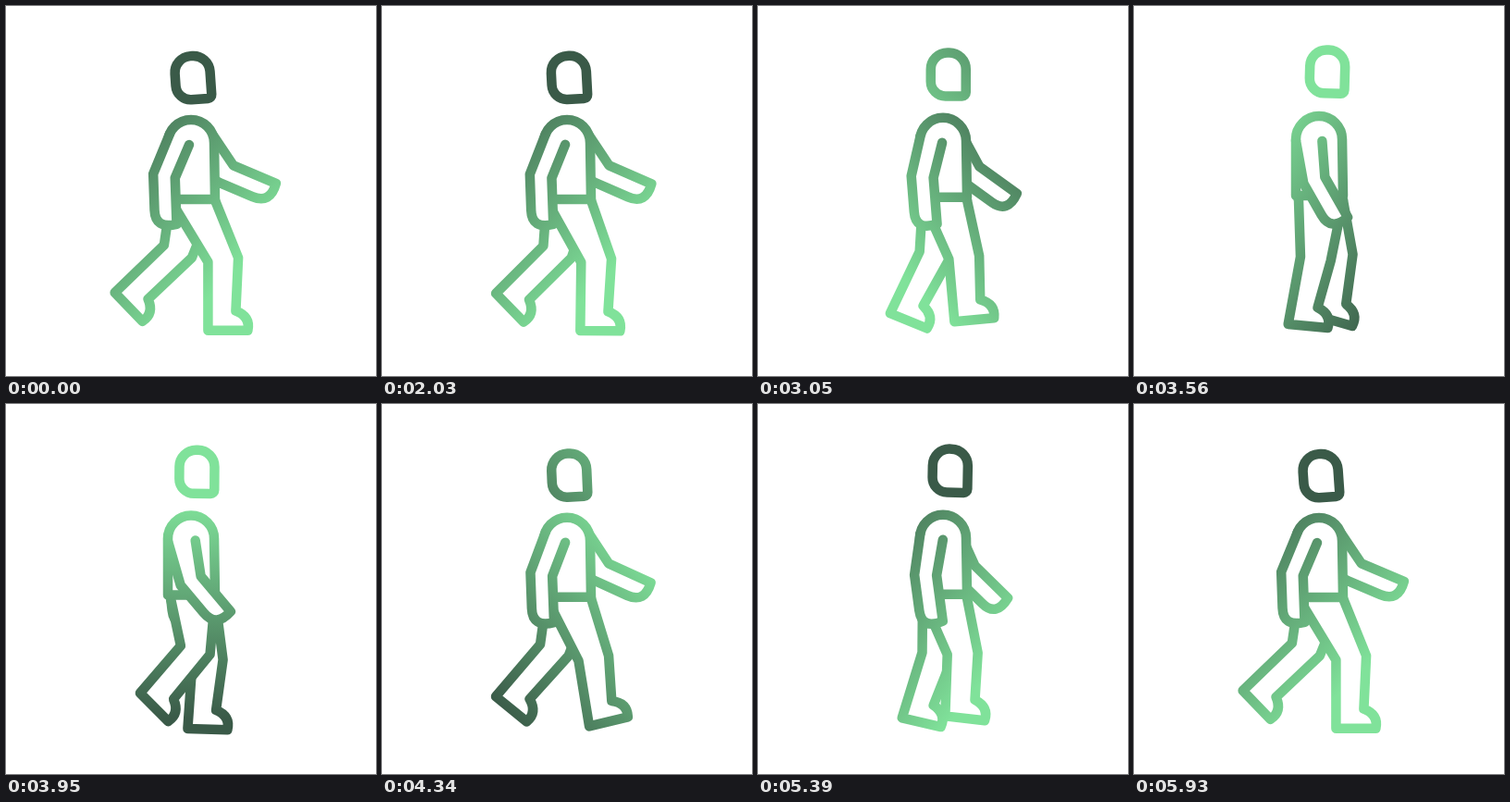
Recreate the animation shown at these times as an HTML page with a canvas. Size 400x400 px, loop 5.96 s.

```html
<!DOCTYPE html>
<html lang="en">
<head>
<meta charset="utf-8">
<title>Walking figure</title>
<style>
  html, body { margin: 0; height: 100%; overflow: hidden; background: #fff; }
  canvas { display: block; width: 400px; height: 400px; }
</style>
</head>
<body>
<canvas width="400" height="400"></canvas>
<script>
const ctx = document.querySelector('canvas').getContext('2d');
const LOOP = 5960, START = 2000, FRAME = 30, STEP = 597, STEPS = 6;
const { PI, sin, cos, min, max, floor, sqrt } = Math;
const rad = deg => deg * PI / 180;
const mix = (a, b, k) => a + (b - a) * k;

// Leg gait: phase in steps, then thigh, shin and foot angles
const gait = [
  [0,    22,  0,   0],
  [.6,  -11, -9,   4],
  [.87, -21, -37,  35],
  [1,   -22, -46,  46],
  [1.3, -3,  -40,  45],
  [1.6,  10, -9,   18],
  [1.87, 14,  15, -22],
  [2,    22,  0,   0]
];

function sampleGait(phase) {
  const i = gait.findIndex(key => key[0] > phase);
  const a = gait[i - 1], b = gait[i], k = (phase - a[0]) / (b[0] - a[0]);
  return a.map((v, j) => mix(v, b[j], k)).slice(1).map(rad);
}

// Limb angles are measured from straight down, positive to the right
const along = ([x, y], angle, length) => [x + sin(angle) * length, y + cos(angle) * length];
const behind = ([x, y], angle, width) => [x - cos(angle) * width, y + sin(angle) * width];

function draw(build) {
  ctx.beginPath();
  build();
  ctx.fill();
  ctx.stroke();
}

const lines = (...points) => points.forEach(p => ctx.lineTo(...p));

function arm(shoulder, upper, fore, lift) {
  const elbow = along(shoulder, upper, 39);
  const elbowBack = behind(elbow, (upper + fore) / 2, 24);
  const palm = along(elbowBack, fore, 39);
  draw(() => {
    lines(shoulder, elbow, along(elbow, fore, 50));
    ctx.quadraticCurveTo(...along(palm, fore, 21), ...palm);
    lines(elbowBack, behind([200, 148 - lift], upper, 25));
  });
}

function leg(phase) {
  const [thigh, shin, foot] = sampleGait(phase % 2);
  const bend = 1 - .12 * max(0, -sin(PI * phase));
  const knee = along([226, 210], thigh, 67 * bend);
  const kneeBack = behind(knee, (thigh + shin) * .36, 33);
  const [hx, hy] = along(kneeBack, shin, 74 * bend);
  const onFoot = (u, v) => [hx + u * cos(foot) + v * sin(foot), hy + u * sin(foot) - v * cos(foot)];
  draw(() => {
    lines([178, 210], kneeBack, [hx, hy], onFoot(43, 0));
    ctx.quadraticCurveTo(...onFoot(46, 15), ...onFoot(30, 21));
    lines(knee, [226, 210]);
  });
}

function torso(lift) {
  draw(() => {
    ctx.moveTo(175, 209 - lift);
    ctx.arc(200, 148 - lift, 25, PI, 0);
    ctx.lineTo(226, 209 - lift);
    ctx.closePath();
  });
}

function head(rise) {
  ctx.save();
  ctx.translate(202 + 8 * rise, 78 - 7.5 * rise);
  ctx.rotate(rad(-4 + 6 * sqrt(rise)));
  draw(() => ctx.roundRect(-19, -24, 38, 47, [18, 18, 4, 16]));
  ctx.restore();
}

function gradient(time) {
  const x = 1 - (1 - time / (LOOP - START)) ** 1.3;
  const angle = rad(45 + 360 * x * x * (3 - 2 * x));
  const at = d => [200 + cos(angle) * d, 200 + sin(angle) * d];
  const g = ctx.createLinearGradient(...at(-140), ...at(95));
  g.addColorStop(0, '#3a5a48');
  g.addColorStop(1, '#80e29a');
  return g;
}

function render(now) {
  const time = max(0, floor((now % LOOP - START) / FRAME) * FRAME);
  const phase = min(time / STEP, STEPS);
  const near = (1 - cos(PI * phase)) / 2, far = 1 - near;
  const rise = sin(PI * phase) ** 2, lift = 4.5 * rise;

  ctx.clearRect(0, 0, 400, 400);
  ctx.fillStyle = '#fff';
  ctx.strokeStyle = gradient(time);
  ctx.lineWidth = 10.5;
  ctx.lineCap = ctx.lineJoin = 'round';

  // The forearm trails the upper arm through each swing
  const swingArm = (shoulder, k, upper, fore) =>
    arm(shoulder, rad(mix(-23, upper, k ** .7)), rad(mix(2, fore, k ** 1.5)), lift);

  swingArm([mix(200, 224, far), mix(150, 140, far) - lift], far, 34, 67);
  leg(phase + 1);
  leg(phase);
  torso(lift);
  swingArm([mix(198, 206, near), 150 - lift], near, 13, 52);
  head(rise);
  requestAnimationFrame(render);
}
requestAnimationFrame(render);
</script>
</body>
</html>
```
